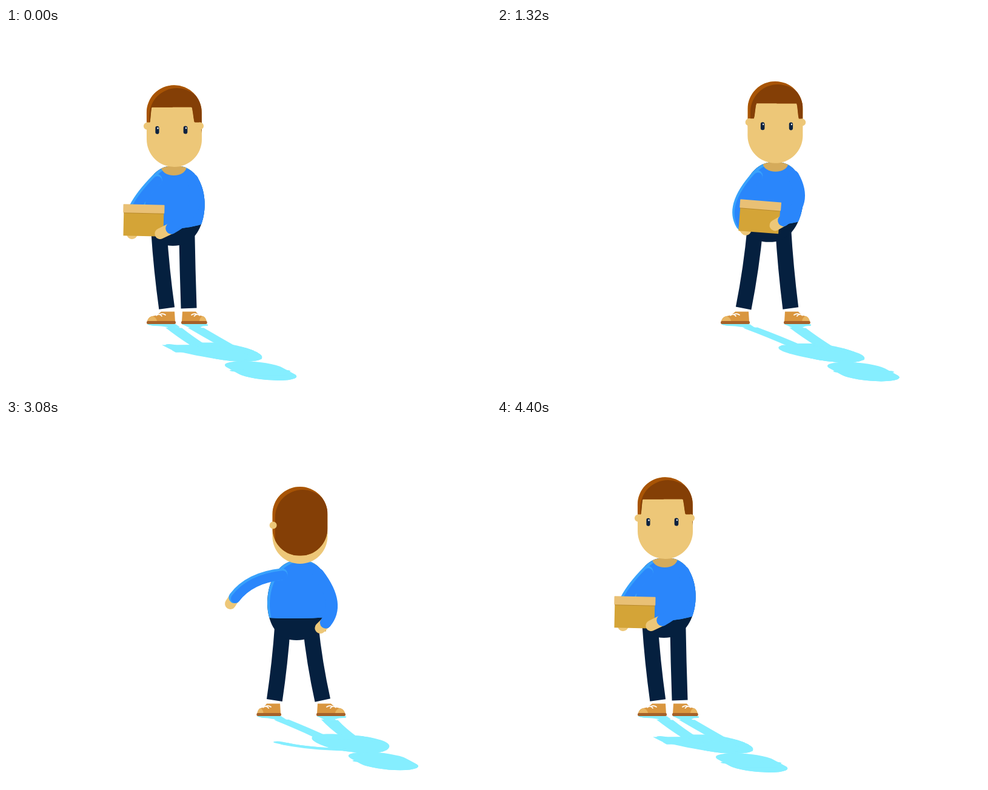
These frames come from a looping animation (800 px wide and 600 px high, 4440 ms). An HTML page with a canvas:

```html
<!DOCTYPE html>
<html lang="en">
<head>
<meta charset="utf-8">
<title>Box walk</title>
<style>
html, body { margin: 0; width: 100%; height: 100%; overflow: hidden; background: #fff; }
canvas { display: block; }
</style>
</head>
<body>
<canvas id="stage" width="800" height="600"></canvas>
<script>
const ctx = document.getElementById('stage').getContext('2d');
const LOOP = 4440, STEP = 40, GROUND = 488, R = 45.5;
const C = {
  skin: '#edc778', neck: '#d5ab5b', hair: '#843f06', hairLight: '#a85405', eye: '#0b2240',
  blue: '#2a86fb', blueLight: '#38a2fc', navy: '#05203f', box: '#d4a437', lid: '#e9c075',
  seam: '#b98a2c', shoe: '#d9963f', toe: '#e8b562', sole: '#a5622a', shadow: '#85eeff'
};
const rad = deg => deg * Math.PI / 180;
const sin = deg => Math.sin(rad(deg)), cos = deg => Math.cos(rad(deg));
const clamp = (v, lo = 0, hi = 1) => Math.min(hi, Math.max(lo, v));
const ease = u => u * u * (3 - 2 * u);
const mix = (a, b, u) => a + (b - a) * u;

// x, y: neck; turn: degrees around the vertical axis; box: offset from the neck;
// arm: 1 stretches arm B, -1 arm A, 0 none; rx, ry: stretched hand from the neck.
// A value left out runs on between its neighbours.
const KEYS = [
  { t: 0, x: 278, y: 227, turn: -7, box: -51, arm: 0 },
  { t: 560, x: 456 },
  { t: 720, x: 509, y: 227, turn: 20, box: -54, arm: 1, rx: 109, ry: -25, curl: 20 },
  { t: 880, y: 218, rx: 119, ry: -33 },
  { t: 1040, x: 509, y: 227, turn: 20, box: -54, arm: 1, rx: 109, ry: -25, curl: 20 },
  { t: 1620, x: 403, y: 214, turn: -14, box: 6, arm: -1, rx: -112, ry: -40, curl: -30 },
  { t: 1840, y: 219, rx: -92, ry: 20, curl: -78 },
  { t: 2040, y: 214, rx: -112, ry: -40, curl: -30 },
  { t: 2240, x: 403, y: 219, turn: -14, box: 6, arm: -1, rx: -92, ry: 20, curl: -78 },
  { t: 2560, x: 485, y: 229, turn: 87, box: 40, arm: 0 },
  { t: 2800, x: 529, y: 222 },
  { t: 3080, x: 485, y: 231, turn: 183, box: 11, arm: 1, rx: -115, ry: 72, curl: -18 },
  { t: 3380, x: 402, y: 206 },
  { t: 3720, x: 357, y: 223, turn: 248, box: -35, arm: 1, rx: -98, ry: 6, curl: 5 },
  { t: 4060, x: 278, y: 227, turn: 353, box: -51, arm: 0 }
];
// each step: start, end, new x, new facing
const FOOT_A = { x: 267, face: -1, steps: [[360, 700, 404, -1], [2500, 2860, 525, 1], [3440, 4000, 267, -1]] };
const FOOT_B = { x: 302, face: .75, steps: [[100, 420, 486, .8], [2880, 3080, 441, -.65],
  [3260, 3480, 389, -1], [3840, 4060, 302, .75]] };

// monotone cubic through the keys that set this value
function valueAt(name, t) {
  const k = KEYS.filter(key => name in key);
  let i = 0;
  while (i < k.length - 2 && k[i + 1].t <= t) i++;
  const a = k[i], b = k[i + 1], span = b.t - a.t, u = clamp((t - a.t) / span);
  const secant = j => k[j] && k[j + 1] ? (k[j + 1][name] - k[j][name]) / (k[j + 1].t - k[j].t) : 0;
  const slope = j => {
    const p = secant(j - 1), q = secant(j);
    return p * q <= 0 ? 0 : 2 * p * q / (p + q);
  };
  return mix(a[name], b[name], ease(u))
    + span * u * (1 - u) * (slope(i) * (1 - u) - slope(i + 1) * u);
}

function footAt({ x, face, steps }, t) {
  let swing = 0, roll = 0;
  for (const [from, to, nextX, nextFace] of steps) {
    const u = clamp((t - from) / (to - from));
    if (u > 0 && u < 1) {
      swing = Math.sin(Math.PI * u) ** 2;
      roll = 15 * Math.sign(nextX - x) * swing;
    }
    x = mix(x, nextX, ease(u));
    face = mix(face, nextFace, ease(clamp(u * 4 - .8)));
  }
  return { x, y: GROUND - 12 * swing, face, roll };
}

let tone = null;
function fill(color, path) {
  ctx.fillStyle = tone || color;
  ctx.fill(path);
}
function stroke(color, width, path, cap = 'round') {
  ctx.strokeStyle = tone || color;
  ctx.lineWidth = width;
  ctx.lineCap = cap;
  ctx.stroke(path);
}
function place(x, y, angle, draw) {
  ctx.save();
  ctx.translate(x, y);
  ctx.rotate(rad(angle));
  draw();
  ctx.restore();
}
function shape(build) {
  const p = new Path2D();
  build(p);
  return p;
}
const rect = (x, y, w, h, r = 0) => shape(p => p.roundRect(x, y, w, h, r));
const oval = (x, y, rx, ry) => shape(p => p.ellipse(x, y, rx, ry, 0, 0, 7));
const curve = (a, c, b) => shape(p => { p.moveTo(...a); p.quadraticCurveTo(...c, ...b); });

function drawShoe({ x, y, face, roll }) {
  place(x, y, roll, () => {
    ctx.scale(face < 0 ? -1 : 1, 1);
    const k = Math.abs(face), tip = 13 + 21 * k;
    const upper = shape(p => {
      p.moveTo(-12, -4);
      p.lineTo(-11, -20.5);
      p.lineTo(11, -20.5);
      p.quadraticCurveTo(11 + 6 * k, -14, tip - 8 * k, -13);
      p.quadraticCurveTo(tip - 1, -11, tip, -4);
      p.closePath();
    });
    fill(C.shoe, upper);
    ctx.save();
    ctx.clip(upper);
    fill(C.toe, oval(tip - 4 * k, -4, 12 * k, 10));
    ctx.restore();
    if (!tone) for (const d of [0, 6])
      stroke('#fff', 1.8, curve([4 + d * k, -15 + d * .3], [8 + d * k, -18], [13 + d * k, -16 + d * .3]));
    fill(C.sole, rect(-13, -5, tip + 14, 5, 2));
  });
}

function drawLeg(hx, hy, foot) {
  const ax = foot.x + (hx - foot.x) * .12 - foot.roll * .3, ay = foot.y - 26;
  stroke('#fff', 19, curve([ax, ay - 3], [ax, ay], [foot.x, foot.y - 17]), 'butt');
  drawShoe(foot);
  stroke(C.navy, 26, curve([hx, hy], [mix(hx, ax, .32), (hy + ay) / 2], [ax, ay]), 'butt');
}

function drawBody({ x, y, turn, lean }) {
  const outline = shape(p => {
    for (let a = 0; a < 360; a += 4) {
      const down = (1 - cos(a)) / 2, side = sin(a);
      p.lineTo(x + lean * down + 51 * Math.sign(side) * Math.abs(side) ** .85, y + 132 * down);
    }
    p.closePath();
  });
  const mid = x + lean * .7, slope = 10 * sin(turn);
  fill(C.navy, outline);
  ctx.save();
  ctx.clip(shape(p => {
    p.moveTo(mid - 58, y + 94 - slope);
    p.quadraticCurveTo(mid, y + 106 + 8 * cos(turn), mid + 58, y + 94 + slope);
    p.lineTo(mid + 100, y - 10);
    p.lineTo(mid - 100, y - 10);
    p.closePath();
  }));
  fill(C.blueLight, outline);
  ctx.clip(outline);
  place(4, 3, 0, () => fill(C.blue, outline));
  const open = cos(turn);
  if (open > .2) fill(C.neck, oval(x + 10 * sin(turn), y + 2, 21 * open, 14));
  ctx.restore();
}

// one curve from shoulder to hand; the sleeve covers most of it
function drawArm(p, side, stretch) {
  const shoulder = [p.x + side * 30 * cos(p.turn), p.y + 23];
  const grip = side < 0 ? -cos(p.turn - 40) : cos(p.turn + 20);
  const hand = [mix(p.x + p.box + 28 * grip, p.x + p.rx, stretch), mix(p.y + 112, p.y + p.ry, stretch)];
  const midY = (shoulder[1] + hand[1]) / 2;
  const bend = [
    mix((shoulder[0] + hand[0]) / 2 + 52 * grip, mix(shoulder[0], hand[0], .72), stretch),
    midY + mix(12, p.curl, stretch)
  ];
  const cut = .87, along = (a, b) => a.map((v, i) => mix(v, b[i], cut));
  const bend2 = along(shoulder, bend), cuff = along(bend2, along(bend, hand));
  const sleeve = curve(shoulder, bend2, cuff), lit = shoulder[0] < p.x - 5;
  stroke(C.skin, 18, curve(cuff, cuff, hand));
  stroke(lit ? C.blueLight : C.blue, 19, sleeve);
  if (lit) place(1.6, 1.8, 0, () => stroke(C.blue, 15, sleeve));
}

function drawBox({ x, y, box, lean }) {
  place(x + box, y + 90, -.45 * lean, () => {
    fill(C.box, rect(-33, -14, 66, 40));
    fill(C.seam, rect(-33, -13, 66, 2));
    fill(C.lid, rect(-34, -26, 68, 14, 1));
  });
}

// lower edge of the hair for an angle around the head
function hairEdge(angle) {
  const m = Math.abs(((angle + 180) % 360 + 360) % 360 - 180);
  return m < 82 ? mix(-31, -6, ease(clamp((m - 46) / 8))) : 2 + 48 * sin(90 * clamp((m - 82) / 52));
}

function drawHead({ x, y, turn }) {
  const side = sin(turn) * Math.abs(sin(turn)), front = cos(turn);
  const h = 127 + 8 * Math.max(0, front);
  const skull = rect(-R, -h / 2, 2 * R, h, R);
  place(x + 38 * side, y - 61.5 - 4 * front + 5.5 * Math.abs(side), 18 * side, () => {
    fill(C.skin, skull);
    ctx.save();
    ctx.clip(skull);
    const hair = shape(p => {
      p.moveTo(-R - 2, -h);
      for (let phi = -90; phi <= 90; phi += 2) p.lineTo(R * sin(phi) * 1.01, hairEdge(phi - turn));
      p.lineTo(R + 2, -h);
      p.closePath();
    });
    ctx.clip(hair);
    const rise = 13 * Math.min(0, front);
    ctx.clip(rect(-R, -h, 2 * R, h * 1.5 + rise, R));
    fill(C.hairLight, hair);
    place(4.5, 5, 0, () => fill(C.hair, skull));
    ctx.restore();
    for (const s of [-1, 1]) {
      const ear = s * 80 + turn, eye = s * 31 + turn, c = cos(eye);
      if (cos(ear) > -.15) fill(C.skin, oval(R * sin(ear) * .98, 0, 6, 6));
      if (c < .25) continue;
      const w = 3 + 4 * c, ex = R * sin(eye);
      fill(C.eye, rect(ex - w / 2, 0, w, 13, w / 2));
      fill('#fff', oval(ex + 1, 3.5, 1.1, 1.4));
    }
  });
}

// b body, x box, A and B arms, from back to front
function layers(turn) {
  if (turn < 50 || turn > 310) return 'bAxB';
  return turn < 130 ? 'BbxA' : turn < 215 ? 'xbBA' : 'AxbB';
}

function drawFigure(p) {
  const { footA, footB } = p, hipX = p.x + p.lean;
  const leg = foot => drawLeg(hipX + clamp(1.35 * (foot.x - p.stand), -23, 23), p.y + 108, foot);
  for (const foot of sin(p.turn) < 0 ? [footA, footB] : [footB, footA]) leg(foot);
  const parts = {
    b: () => drawBody(p),
    x: () => drawBox(p),
    A: () => drawArm(p, -1, Math.max(0, -p.arm)),
    B: () => drawArm(p, 1, Math.max(0, p.arm))
  };
  for (const key of layers(p.turn)) parts[key]();
  drawHead(p);
}

function render(t) {
  const p = { footA: footAt(FOOT_A, t), footB: footAt(FOOT_B, t) };
  for (const name of ['x', 'y', 'turn', 'box', 'arm', 'rx', 'ry', 'curl']) p[name] = valueAt(name, t);
  p.stand = (p.footA.x + p.footB.x) / 2;
  p.lean = .35 * (p.stand - p.x) - 5;
  ctx.fillStyle = '#fff';
  ctx.fillRect(0, 0, 800, 600);
  // the shadow is the same figure, flattened and slanted on the floor
  const slant = .437, flat = .236;
  tone = C.shadow;
  ctx.save();
  ctx.transform(1, 0, -slant, -flat, slant * GROUND, GROUND * (1 + flat));
  drawFigure(p);
  ctx.restore();
  tone = null;
  drawFigure(p);
}

const start = performance.now();
function tick() {
  const t = Math.max(0, performance.now() - start) % LOOP;
  render(Math.floor(t / STEP) * STEP);
  requestAnimationFrame(tick);
}
tick();
</script>
</body>
</html>
```
